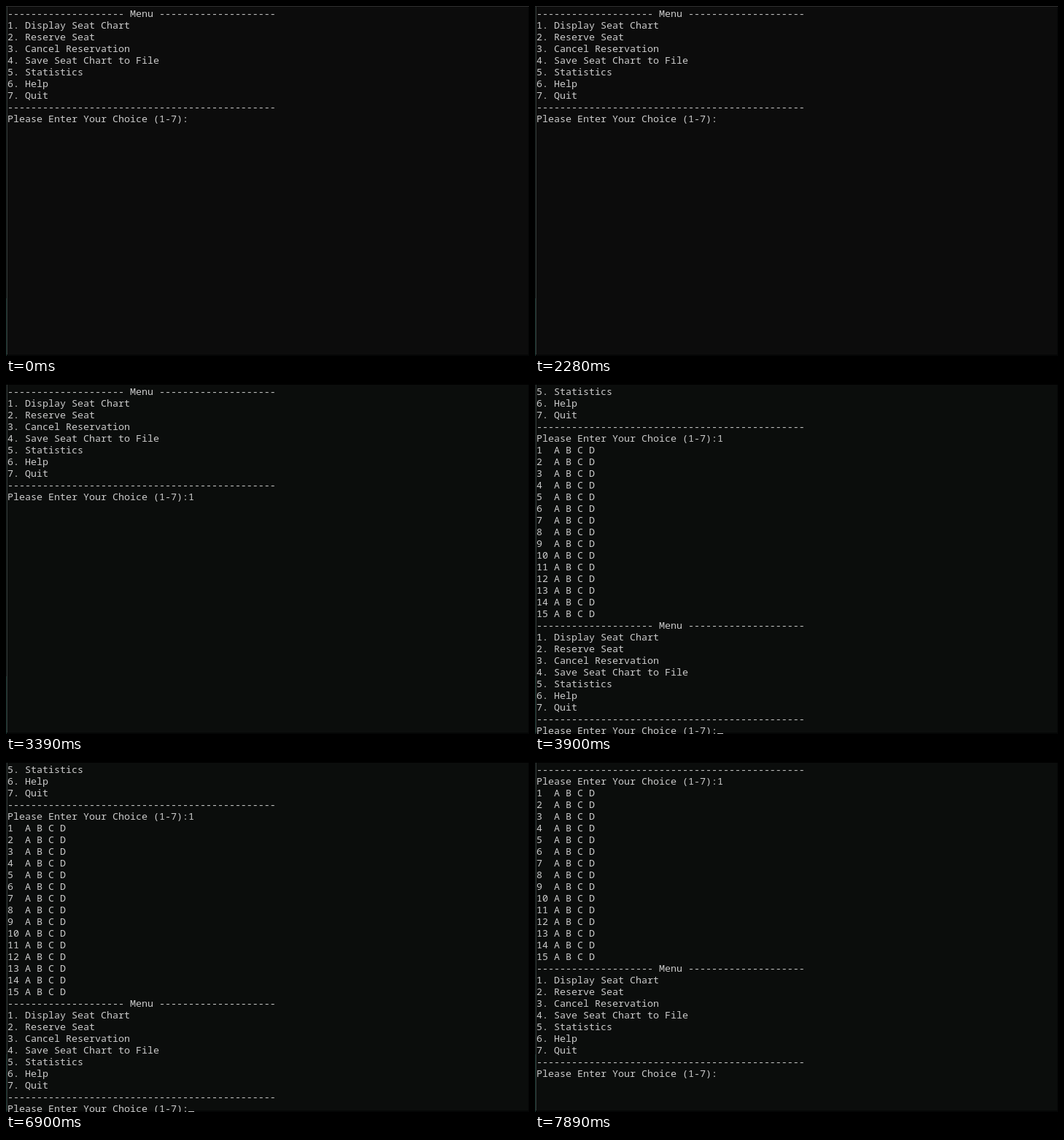
Write an HTML page with a canvas that moves like this. It is 717 px wide and 479 px high and loops after 8000 ms.

```html
<!DOCTYPE html>
<html lang="en">
<head>
<meta charset="utf-8">
<title>Seat menu</title>
<style>
  html, body { margin: 0; overflow: hidden; background: #0c0c0c; }
  canvas { display: block; }
</style>
</head>
<body>
<canvas id="screen" width="717" height="479"></canvas>
<script>
const ctx = document.getElementById('screen').getContext('2d', { alpha: false });
const LOOP = 8000, CELL = 8, ROW = 16, LEFT = 2, TOP = 2;
const FOCUS = 2430, TYPED = 2850, ENTER = 3900, SCROLL = 7470;

const dash = '-'.repeat(20);
const prompt = 'Please Enter Your Choice (1-7):';
const options = ['Display Seat Chart', 'Reserve Seat', 'Cancel Reservation',
  'Save Seat Chart to File', 'Statistics', 'Help', 'Quit'];
const menu = [`${dash} Menu ${dash}`,
  ...options.map((name, i) => `${i + 1}. ${name}`), '-'.repeat(46)];
const seats = Array.from({ length: 15 }, (_, i) => String(i + 1).padEnd(3) + 'A B C D');

// The caret switches at each of these times, starting hidden.
const blinks = [TYPED, 3390, ENTER, 4440, 4980, 5400, 5910, 6480, 6900, SCROLL];

function rect(color, x, y, w, h) {
  ctx.fillStyle = color;
  ctx.fillRect(x, y, w, h);
}

function drawWindow(focused) {
  rect(focused ? '#0b0d0c' : '#0c0c0c', 0, 0, 717, 479);
  rect(focused ? '#000' : '#303030', 0, 0, 717, 1);
  rect('#050606', 0, 477, 717, 2);
  rect('#050606', 716, 1, 1, 478);
  rect('#0d1413', 0, 1, 1, 399);
  rect('#14302b', 0, 400, 1, 79);
  rect('#363a39', 1, 1, 1, 476);
}

function draw(t) {
  const lines = [...menu, prompt + (t >= TYPED ? '1' : '')];
  if (t >= ENTER) lines.push(...seats, ...menu, prompt);
  const first = t >= SCROLL ? 8 : t >= ENTER ? 5 : 0;

  drawWindow(t >= FOCUS);
  ctx.font = '13.333px "Noto Sans Mono", monospace';
  ctx.fillStyle = '#ccc';
  lines.slice(first).forEach((line, row) => ctx.fillText(line, LEFT, TOP + row * ROW + 13));

  if (blinks.filter(time => time <= t).length % 2) {
    const last = lines.length - 1;
    rect('#ccc', LEFT + lines[last].length * CELL, TOP + (last - first) * ROW + 12, CELL, 4);
  }
}

function tick() {
  draw(performance.now() % LOOP);
  requestAnimationFrame(tick);
}
tick();
</script>
</body>
</html>
```
